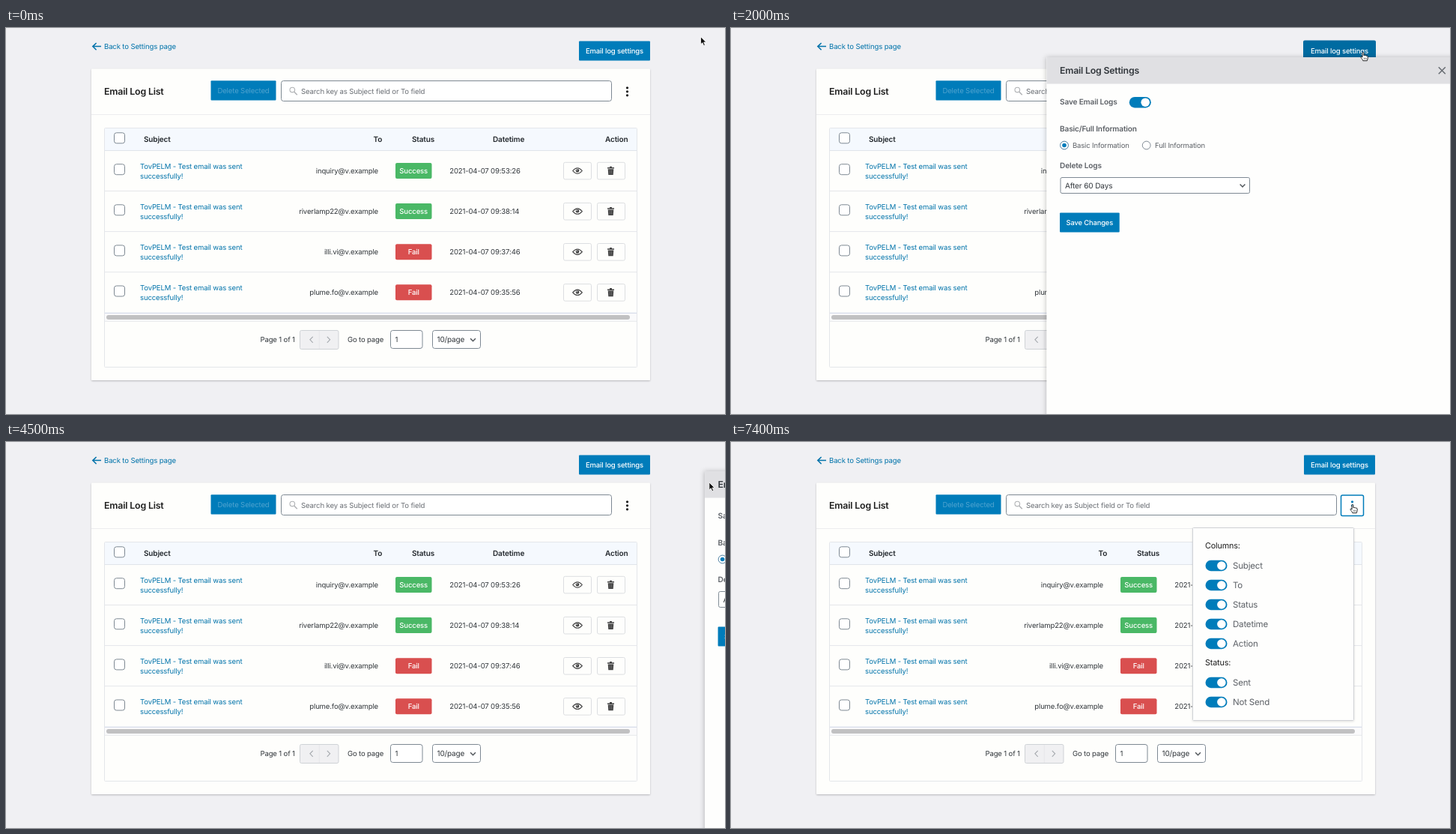
An HTML page for the animation above (8000 ms loop, 960x515 px).

```html
<!DOCTYPE html>
<html lang="en">
<head>
<meta charset="utf-8">
<title>Email log</title>
<style>
  html, body { margin: 0; width: 100%; height: 100%; overflow: hidden; background: #f0f0f3; }
  svg { display: block; width: 100%; height: 100%; }
  text { font-family: Inter, Roboto, sans-serif; letter-spacing: -.0155em; white-space: pre; text-rendering: geometricPrecision; }
</style>
</head>
<body>
<svg id="stage" viewBox="0 0 960 515" xmlns="http://www.w3.org/2000/svg"></svg>
<script>
const LOOP = 8000;
const BLUE = '#007cba', HOVER = '#006ba1', LINK = '#0073aa';
const INK = '#32373c', GREY = '#5c6066', EDGE = '#7e8993', PAPER = '#fefefc';

const text = (x, y, s, size = 9.55, fill = INK, weight = 400, anchor = 'start') =>
  `<text x="${x}" y="${y}" font-size="${size}" fill="${fill}" font-weight="${weight}" text-anchor="${anchor}">${s}</text>`;
const rect = (x, y, w, h, fill, stroke = 'none', r = 0, extra = '') =>
  `<rect x="${x}" y="${y}" width="${w}" height="${h}" rx="${r}" fill="${fill}" stroke="${stroke}" ${extra}/>`;
const path = (d, stroke, width = 1.2, extra = '') =>
  `<path d="${d}" fill="none" stroke="${stroke}" stroke-width="${width}" ${extra}/>`;
const dot = (x, y, r, fill, extra = '') => `<circle cx="${x}" cy="${y}" r="${r}" fill="${fill}" ${extra}/>`;
const group = (id, body, extra = '') => `<g id="${id}" ${extra}>${body}</g>`;
const toggle = (x, y) => rect(x, y - 7.2, 29, 14.4, BLUE, 'none', 7.2) + dot(x + 21.4, y, 5.8, '#fff');
const checkbox = y => rect(144.5, y, 14, 14, '#fff', EDGE, 3);
const chevron = (x, y) => path(`M${x - 3.4} ${y - 1.8}l3.4 3.6 3.4 -3.6`, '#50555b', 1.4);

function row([mail, ok, time], i) {
  const y = 190.5 + i * 54.1;
  const eye = `<path d="M756.7 ${y}q6.3 -7.4 12.6 0q-6.3 7.4 -12.6 0z" fill="none" stroke="#444" stroke-width="1.1"/>` +
    dot(763, y - .3, 2.3, '#444') + dot(762.3, y - 1.1, .7, '#fff');
  const bin = `<path d="M803 ${y - 4.4}h3v-1.3h3v1.3h3v1.5h-9zM803.7 ${y - 2.2}h7.6l-.6 7.7h-6.4z" fill="#444"/>` +
    path(`M806.2 ${y - .8}v4.8M808.8 ${y - .8}v4.8`, '#8a8a8a', .6);
  return checkbox(y - 8.8) +
    text(179, y - 3, 'TovPELM - Test email was sent', 9.55, LINK) +
    text(179, y + 10, 'successfully!', 9.55, LINK) +
    text(497, y + 3.5, mail, 9.55, INK, 400, 'end') +
    rect(520, y - 10.5, 48.5, 21, ok ? '#4ab866' : '#d94f4f', 'none', 2) +
    text(544.2, y + 3.5, ok ? 'Success' : 'Fail', 9.55, '#fff', 500, 'middle') +
    text(592.3, y + 3.5, time, 9.55) +
    rect(744.5, y - 11.2, 37, 22.6, PAPER, '#dcdee1', 2) + eye +
    rect(789.5, y - 11.2, 37, 22.6, PAPER, '#dcdee1', 2) + bin +
    (i < 3 ? path(`M132 ${y + 27}H842`, '#e4e6ea', 1) : '');
}

const rows = [
  ['inquiry@v.example', true, '2021-04-07 09:53:26'],
  ['riverlamp22@v.example', true, '2021-04-07 09:38:14'],
  ['illi.vi@v.example', false, '2021-04-07 09:37:46'],
  ['plume.fo@v.example', false, '2021-04-07 09:35:56']
];

const heads = [['Subject', 184], ['To', 490.5], ['Status', 542], ['Datetime', 650], ['Action', 800]];

const page =
  rect(0, 0, 960, 515, '#f0f0f3') +
  path('M127 24.6H116M120.6 20l-4.8 4.6 4.8 4.6', LINK, 1.5) +
  text(131, 27.7, 'Back to Settings page', 9.6, LINK) +
  rect(765, 17.5, 95, 26, BLUE, 'none', 1, 'id="button"') +
  text(812.5, 34.2, 'Email log settings', 9.5, '#fff', 500, 'middle') +
  rect(114, 54.5, 746, 415.5, PAPER, 'none', 1, 'filter="url(#cardShade)"') +
  path('M114 115.5H860', '#ececee', 1) +
  text(131, 89.2, 'Email Log List', 12.4, '#1e1e1e', 600) +
  rect(273.5, 70.3, 87, 26.2, BLUE, 'none', 1) +
  text(317, 87.2, 'Delete Selected', 9.6, '#4fa3cf', 400, 'middle') +
  rect(367.5, 70.5, 441, 27, '#fff', EDGE, 3) +
  dot(382.3, 82.6, 3.3, 'none', 'stroke="#b0b2b5" stroke-width="1.1"') + path('M384.8 85.2l4 4', '#b0b2b5', 1.5) +
  text(394, 87.6, 'Search key as Subject field or To field', 9.6, '#6c7076') +
  rect(814.5, 71, 30, 27.5, '#fff', BLUE, 2, 'id="ring" stroke-width="1.5"') +
  group('dots', [79.8, 84.8, 89.8].map(y => dot(829.5, y, 1.65)).join('')) +
  rect(131.5, 133.5, 711, 319, PAPER, '#e4e6ea', 1) +
  rect(132, 134, 710, 29, '#f5f9fe') + path('M132 163.5H842', '#e0e4ea', 1) +
  checkbox(139.8) +
  heads.map(([s, x]) => text(x, 152.2, s, 10, '#23282d', 600)).join('') +
  rows.map(row).join('') +
  rect(132, 380, 710, 11, '#fafafb') + path('M132 380.3H842', '#cdd5e6', 1) + path('M132 391.3H842', '#e6e8ec', 1) +
  rect(134, 383, 699, 6, '#c1c1c2', 'none', 3) +
  text(339.5, 419.2, 'Page 1 of 1') +
  rect(392.5, 403.5, 51.5, 25, '#f0f0f2', '#cfd2d6', 2) + path('M418.3 404v24', '#e6e7ea', 1) +
  path('M409.7 411.8l-3.8 4 3.8 4M428.8 411.8l3.8 4-3.8 4', '#a4a8ad', 1.1) +
  text(456, 419.4, 'Go to page') +
  rect(513.5, 403.5, 42.5, 24, '#fff', EDGE, 3) + text(519.5, 419.4, '1') +
  rect(569.5, 403.5, 64, 24, '#fff', EDGE, 3) + text(575.5, 419.4, '10/page', 10) + chevron(623.5, 416);

const drawer =
  rect(421.5, 39, 560, 490, '#fefefd', 'none', 0, 'filter="url(#drawerShade)"') +
  rect(421.5, 39, 560, 35.5, '#e0e0e3') +
  text(439, 60.8, 'Email Log Settings', 12.3, '#32373c', 600) +
  group('close', rect(918, 41.5, 40, 26, '#e3e4e9', '#86a4d8', 0, 'id="closeRing"') +
    path('M944.8 52.3l9 9M953.8 52.3l-9 9', '#666b71', 1.5, 'id="cross"')) +
  text(439, 102.2, 'Save Email Logs', 10.1, GREY, 600) + toggle(531.8, 99.2) +
  text(439, 138, 'Basic/Full Information', 10.1, GREY, 600) +
  dot(445, 156.5, 5.4, '#fff', 'stroke="#4a7d9f"') + dot(445, 156.5, 2.8, BLUE) +
  text(456, 160, 'Basic Information', 9.5, GREY) +
  dot(554.7, 156.5, 5.4, '#fff', `stroke="${EDGE}"`) + text(566, 160, 'Full Information', 9.5, GREY) +
  text(439, 187.4, 'Delete Logs', 10.1, GREY, 600) +
  rect(440, 199.5, 252.5, 21, '#fff', EDGE, 2, 'id="select"') +
  text(446, 213.6, 'After 60 Days', 10.1) + group('arrow', chevron(683, 210.3)) +
  rect(439, 246.5, 79.7, 26, BLUE, 'none', 1) +
  text(478.8, 263.2, 'Save Changes', 9.4, '#fff', 500, 'middle');

const option = (s, y) => toggle(633.5, y) + text(670, y + 4, s, 11.5, GREY);
const menu =
  rect(616.5, 114.5, 215, 257, '#fefefd', '#d0d2d6', 1, 'filter="url(#menuShade)"') +
  text(633, 142, 'Columns:', 10.8, '#1e1e1e') +
  ['Subject', 'To', 'Status', 'Datetime', 'Action'].map((s, i) => option(s, 165 + i * 26)).join('') +
  text(633, 298, 'Status:', 10.8, '#1e1e1e') +
  option('Sent', 321) + option('Not Send', 347);

const shade = (id, dx, dy, blur, alpha) =>
  `<filter id="${id}" x="-10%" y="-10%" width="120%" height="120%"><feDropShadow dx="${dx}" dy="${dy}" stdDeviation="${blur}" flood-opacity="${alpha}"/></filter>`;

const pointer =
  group('pointer', '<path transform="scale(1.08)" d="M0 0V9.4L2.2 7.4L3.8 11L5.5 10.2L3.9 6.8H6.8Z" fill="#111" stroke="#fff" stroke-width=".8" stroke-linejoin="round"/>') +
  group('hand', '<path d="M-1 .9C-1 -.4 .9 -.4 .9 .9V4.2C1.3 3.5 2.6 3.6 2.8 4.5C3.3 3.8 4.5 4 4.6 4.9C5.2 4.4 6.2 4.7 6.2 5.7V8C6.2 9.3 5.3 9.9 5.3 11.2H-.2C-.4 9.8 -2 8.4 -2.9 6.8C-3.4 5.8 -2.2 5.2 -1.5 6L-1 6.6Z" fill="#fff" stroke="#111" stroke-width=".9" stroke-linejoin="round"/><path d="M1.2 7.2v2.2M2.7 7.2v2.2M4.2 7.2v2.2" stroke="#111" stroke-width=".5"/>');

document.getElementById('stage').innerHTML =
  `<defs>${shade('cardShade', 0, 1, 1, .24)}${shade('drawerShade', -1, 0, 3, .22)}${shade('menuShade', 0, 1, 1.5, .12)}</defs>` +
  page + group('drawer', drawer) + group('menu', menu) + pointer;

const el = id => document.getElementById(id);
const set = (id, attrs) => { for (const k in attrs) el(id).setAttribute(k, attrs[k]); };
const show = (id, on) => set(id, { visibility: on ? 'visible' : 'hidden' });
const smooth = u => u * u * (3 - 2 * u);

// Each move: first step, last step, end point of the pointer tip.
const moves = [
  [700, 1200, 844, 32.5],
  [3400, 4200, 938.8, 53.8],
  [5700, 6500, 843, 83.5],
  [6600, 6800, 830, 83.5]
];

function tipAt(t) {
  let x = 927.5, y = 11.7;
  for (const [a, b, ex, ey] of moves) {
    if (t < a) break;
    const u = smooth(Math.min(1, (t - a + 100) / (b - a + 100)));
    x += (ex - x) * u;
    y += (ey - y) * u;
  }
  return [x, y];
}

// Value of a short transition sampled every 100 ms.
const sample = (t, start, steps) => t < start ? 0 : steps[Math.min(steps.length - 1, (t - start) / 100)];
const SLIDE = [.049, .62, .95, 1];

function draw(now) {
  const t = Math.floor(now % LOOP / 100) * 100;
  const [x, y] = tipAt(t);

  const onButton = t < 4300 && x < 860 && y > 18;
  const onDots = t >= 6600;
  const grow = t >= 1500 && t < 4200 ? 1 : 0;
  set('button', {
    x: 765 - grow, y: 17.5 - grow, width: 95 + 2 * grow, height: 26 + 2 * grow,
    rx: 1 + grow, fill: onButton ? HOVER : BLUE
  });

  const open = sample(t, 1700, SLIDE) - sample(t, 4300, SLIDE);
  const shift = 538.5 * (1 - open);
  show('drawer', open > 0);
  set('drawer', { transform: `translate(${shift} 0)` });
  set('close', { transform: `translate(${-shift / 2} 0)` });
  set('select', { width: 252.5 - shift / 4 });
  set('arrow', { transform: `translate(${-shift / 4} 0)` });
  set('cross', { stroke: t >= 3400 && x > 918 ? '#fff' : '#666b71' });
  set('closeRing', { opacity: t >= 4300 ? 1 : 0 });

  set('ring', { opacity: sample(t, 7000, [.6, 1]) });
  set('dots', { fill: onDots ? BLUE : '#1e1e1e' });
  const size = sample(t, 7100, [.5, .9, .98, 1]);
  show('menu', size > 0);
  set('menu', { transform: `translate(831.5 114.5) scale(${size}) translate(-831.5 -114.5)` });

  const hand = onButton || onDots;
  show('hand', hand);
  show('pointer', !hand);
  set(hand ? 'hand' : 'pointer', { transform: `translate(${x} ${y})` });
}

const start = performance.now();
function tick() {
  draw(performance.now() - start);
  requestAnimationFrame(tick);
}
tick();
</script>
</body>
</html>
```
